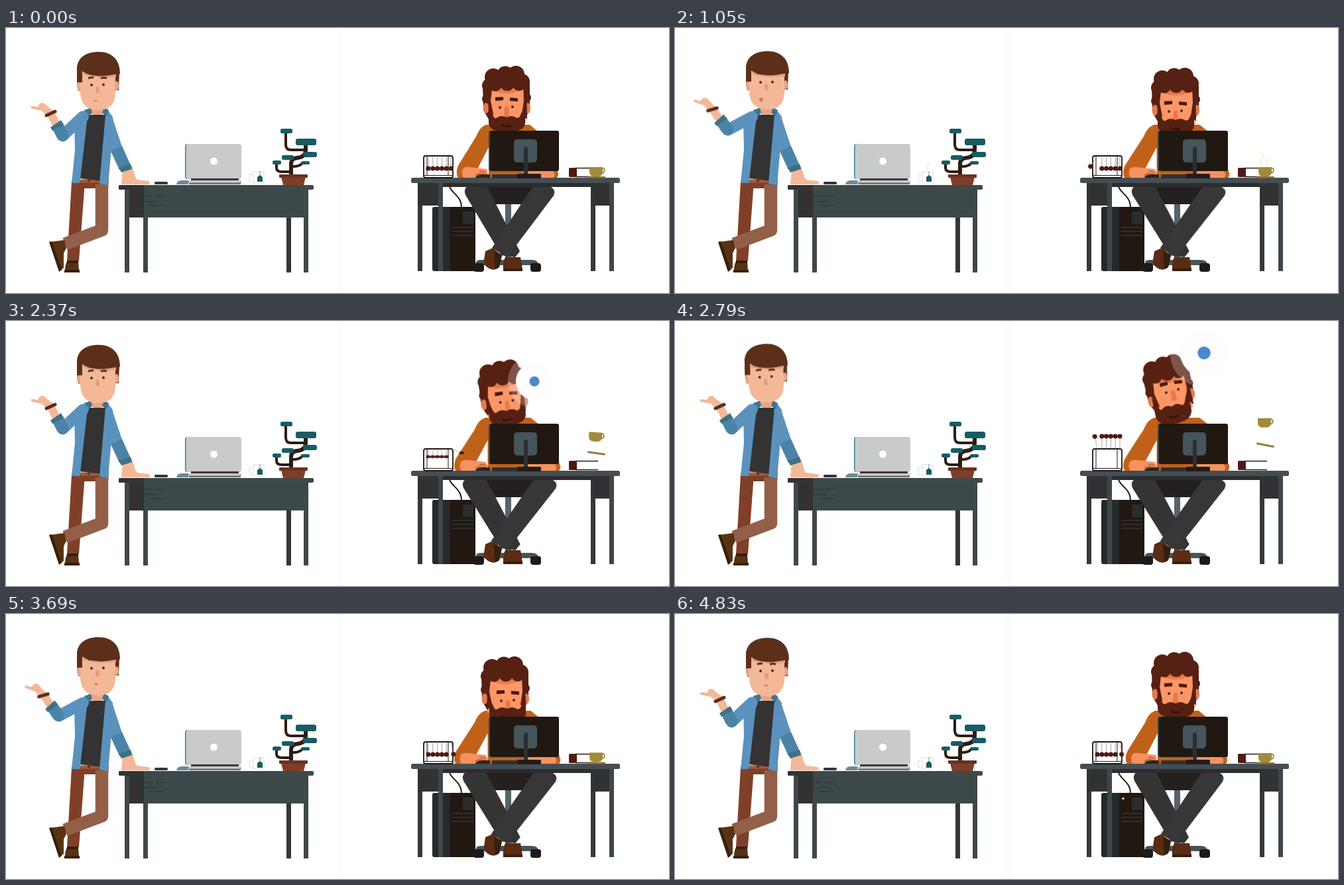
Write an HTML page without scripts that moves like this. It is 1000 by 400 pixels and loops after 4860 ms.

```html
<!DOCTYPE html>
<html lang="en">
<head>
<meta charset="utf-8">
<title>Two desks</title>
<style>
html, body { margin: 0; width: 100%; height: 100%; overflow: hidden; background: #fff; }
svg { display: block; width: 100vw; height: 100vh; }
.a { animation: 4860ms ease-in-out infinite; }

/* standing man */
.upper { animation-name: upper; transform-origin: 115px 135px; }
.fore { animation-name: fore; transform-origin: 84px 163px; }
.hand { animation-name: hand; transform-origin: 67px 128px; }
@keyframes upper { 0%, 13%, 48%, 68%, 97%, 100% { transform: none } 20%, 44.5%, 76%, 91% { transform: rotate(15deg) } }
@keyframes fore { 0%, 13%, 48%, 68%, 97%, 100% { transform: none } 20%, 44.5%, 76%, 91% { transform: rotate(-23deg) } }
@keyframes hand { 0%, 13%, 48%, 68%, 97%, 100% { transform: none } 20%, 44.5%, 76%, 91% { transform: rotate(16deg) } }
.headL { animation-name: headL; transform-origin: 138px 125px; }
@keyframes headL {
  0%, 100% { transform: none } 8% { transform: translate(-1px, -2px) rotate(-1deg) }
  21.6%, 39.5% { transform: translate(0, -1px) } 48.8% { transform: none }
  62%, 67.5% { transform: translate(0, -2px) rotate(-2.5deg) } 76%, 88% { transform: translate(0, -1px) }
}
.faceL { animation-name: faceL; }
@keyframes faceL { 0%, 13%, 48%, 58%, 97%, 100% { transform: none } 20%, 44%, 76%, 90% { transform: translate(0, -3px) } 67% { transform: translate(2px, -2px) } }
.browL { animation-name: browL; }
@keyframes browL { 0%, 13%, 48%, 68%, 97%, 100% { transform: none } 20%, 44%, 76%, 90% { transform: translate(0, -3px) } }
.mouthL { animation-name: mouthL; transform-origin: 136px 109px; }
@keyframes mouthL {
  0% { transform: translate(-1px, 1px) scale(1, .6) } 6% { transform: scale(.9, 1.4) }
  12% { transform: translate(-2px, 0) scale(1, .5) } 21.6% { transform: translate(-6px, 3px) scale(1, 1.5) }
  30% { transform: translate(-2px, 1px) scale(1.2, .6) } 39.5% { transform: translate(-1px, 1px) scale(1, 1.6) }
  46%, 70% { transform: scale(1, .2) }
  77% { transform: translate(0, 1px) scale(1.1, .7) } 85.2% { transform: translate(2px, 1px) scale(.8, 1.3) }
  92% { transform: scale(.8, 1.2) } 100% { transform: translate(1px, -1px) scale(1.1, .6) }
}
.hush { animation-name: hush; animation-timing-function: step-end; }
@keyframes hush { 0%, 72% { opacity: 1 } 46% { opacity: 0 } }

/* sitting man */
.headR { animation-name: headR; transform-origin: 755px 152px; }
@keyframes headR {
  0%, 100% { transform: none } 21.6% { transform: translate(0, 3px) } 39.5%, 45% { transform: translate(-2px, 7px) }
  48.8% { transform: translate(0, 2px) rotate(-6deg) } 57%, 67.5% { transform: translate(0, -6px) rotate(-12deg) }
  76%, 86% { transform: translate(-2px, 7px) }
}
.faceR { animation-name: faceR; }
@keyframes faceR {
  0%, 100% { transform: none } 21.6% { transform: translate(0, 3px) } 39.5%, 45%, 76%, 86% { transform: translate(4px, 4px) }
  48.8% { transform: translate(4px, 0) } 57%, 67.5% { transform: translate(4px, -8px) }
}
.jaw { animation-name: jaw; transform-origin: 755px 158px; }
@keyframes jaw {
  0%, 100% { transform: none } 21.6% { transform: translate(0, 1px) } 39.5%, 45%, 76%, 86% { transform: translate(3px, 1px) }
  48.8% { transform: translate(2px, -1px) } 57%, 67.5% { transform: translate(-2px, 4px) scaleY(1.2) }
}
.sit { animation-name: sit; transform-origin: 760px 0; }
@keyframes sit { 0%, 100% { transform: none } 20%, 86% { transform: scaleX(1.045) } }
.blink { animation-name: blink; transform-origin: 755px 119px; }
@keyframes blink { 0%, 38%, 41%, 100% { transform: none } 39%, 40% { transform: scaleY(.15) } }

/* weightless things */
.cup { animation-name: cup; transform-origin: 891px 217px; }
.saucer { animation-name: saucer; transform-origin: 890px 225px; }
.bubble { animation-name: bubble; }
.flip { animation-name: flip; transform-origin: 0 193px; }
@keyframes cup {
  0%, 45.3%, 76%, 100% { transform: none; animation-timing-function: ease-out }
  48.8% { transform: translate(-1px, -42px) rotate(4deg); animation-timing-function: ease-out }
  55.6% { transform: translate(-1px, -63px) rotate(0deg) }
  67.5% { transform: translate(-1px, -70px) rotate(-6deg); animation-timing-function: ease-in }
}
@keyframes saucer {
  0%, 45.3%, 76%, 100% { transform: none; animation-timing-function: ease-out }
  48.8% { transform: translate(0, -26px) rotate(8deg); animation-timing-function: ease-out }
  55.6% { transform: translate(0, -38px) rotate(11deg) }
  67.5% { transform: translate(0, -43px) rotate(15deg); animation-timing-function: ease-in }
}
@keyframes bubble {
  0%, 45%, 74.5%, 100% { transform: translate(782px, 185px) scale(0); animation-timing-function: ease-out }
  48.8% { transform: translate(797px, 91px) scale(.76); animation-timing-function: ease-out }
  55.6% { transform: translate(798px, 49px) scale(.97) }
  67.5% { transform: translate(798px, 33px) scale(1); animation-timing-function: ease-in }
}
@keyframes flip {
  0%, 45.3%, 76%, 100% { transform: none } 48.8% { transform: scaleY(.63) } 55.6%, 67.5% { transform: scaleY(-1) }
}

/* cradle */
.swingL, .swingR { animation: 810ms infinite; }
.swingL { animation-name: swingL; transform-origin: 637px 193px; }
.swingR { animation-name: swingR; transform-origin: 671px 193px; }
.kick { animation-name: kick; transform-origin: 671px 193px; }
@keyframes swingL { 0% { transform: none; animation-timing-function: ease-out } 25% { transform: rotate(35deg); animation-timing-function: ease-in } 50%, 100% { transform: none } }
@keyframes swingR { 0%, 50% { transform: none; animation-timing-function: ease-out } 75% { transform: rotate(-35deg); animation-timing-function: ease-in } 100% { transform: none } }
@keyframes kick { 0%, 45.3%, 54%, 100% { transform: none } 48.8% { transform: rotate(-44deg) } }

.lamp { animation-name: lamp; animation-timing-function: step-end; }
@keyframes lamp { 0%, 20%, 41%, 62% { opacity: 0 } 12%, 37%, 58%, 97% { opacity: 1 } }
.steam { animation-name: steam; }
@keyframes steam {
  0%, 45%, 77%, 100% { opacity: 0; transform: translate(0, 4px) }
  10% { opacity: .5 } 21.6% { opacity: .8; transform: translate(-3px, 0) }
  39.5% { opacity: .9; transform: translate(3px, 0) } 85.2% { opacity: .9; transform: none }
  99% { opacity: .2; transform: translate(3px, -2px) }
}
</style>
</head>
<body>
<svg viewBox="0 0 1000 400" preserveAspectRatio="none">
<defs>
  <g id="ball"><path d="M637 193V210" stroke="#8a7c70" stroke-width=".7"/><circle cx="637" cy="212" r="3.6" fill="#4d1a14"/></g>
</defs>
<path d="M497 0h9v400h-9z" fill="#fdfdfd"/>
<path d="M505 0h1v400h-1z" fill="#f8f8f8"/>

<g id="left-desk">
  <path d="M179 243h7v126h-7zM207 243h7v126h-7zM449 286h7v83h-7z" fill="#3f484b"/>
  <path d="M186 243h22v43h-22z" fill="#323233"/>
  <path d="M423 286h7v83h-7z" fill="#333536"/>
  <path d="M208 243h248v43h-248z" fill="#3d4849"/>
  <path d="M207 286h7v83h-7z" fill="#3f484b"/>
  <path d="M208 254h14M226 254h14M208 262h22M216 268h23" stroke="#2f3839" stroke-width="1.5"/>
  <rect x="170" y="237" width="294" height="7" rx="2" fill="#3f494b"/>
  <path d="M172 237h36v7h-36q-2 0-2-2v-3q0-2 2-2z" fill="#333334"/>
  <rect x="224" y="232" width="20" height="4" rx="1.5" fill="#333538"/>
  <path d="M257 236q1-6 8-6h10v6z" fill="#6b8b94"/>
  <rect x="270" y="175" width="20" height="53" rx="4" fill="#3d809a"/>
  <rect x="271.5" y="175" width="83.5" height="53" rx="4" fill="#c9cbca"/>
  <circle cx="313.5" cy="201" r="5.5" fill="#fff"/>
  <path d="M279 227h72v3h-72z" fill="#3a3937"/>
  <path d="M275 230h80v4l-2 3h-76l-2-3z" fill="#c6c9c8"/>
  <path d="M276 234.5h78" stroke="#464a49" stroke-width="1.5"/>
  <path d="M373 217h16v17h-16zM373 221h-6v11h6" fill="none" stroke="#e6e9e8" stroke-width="1.5"/>
  <path d="M383 216v7" stroke="#577" stroke-width=".8"/>
  <path d="M379 225l4-3 4 3v7h-8z" fill="#1a5a5e"/>
  <path class="a steam" d="M384 214q-3-4 0-7t1-5" fill="none" stroke="#eceeed" stroke-width="2"/>
  <g fill="none" stroke="#2d1d14" stroke-width="4">
    <path d="M422 156v20q0 8 8 8h22M408 205v6q0 6 8 6h12M447 204q-4 5-14 5"/>
    <path d="M430 223v-18q0-8 9-9 13-1 13-12v-10" stroke-width="6"/>
  </g>
  <g fill="#165d63">
    <rect x="414" y="152" width="18" height="7" rx="2.5"/><rect x="437" y="167" width="31" height="10" rx="3"/>
    <rect x="448" y="187" width="21" height="8" rx="3"/><rect x="416" y="192" width="18" height="7" rx="2.5"/>
    <rect x="402" y="200" width="13" height="6" rx="2.5"/><rect x="445" y="201" width="13" height="5" rx="2"/>
  </g>
  <path d="M415 225h37l-3 12h-31z" fill="#803e28"/>
  <rect x="412" y="221" width="43" height="5" rx="1" fill="#6a3221"/>
</g>

<g id="standing">
  <path d="M99 232h20l-9 120h-18z" fill="#803f28"/>
  <path d="M99 230h56l-1 12h-54z" fill="#803f28"/>
  <path d="M144.500 236V305L89 326" fill="none" stroke="#935f48" stroke-width="19.5" stroke-linejoin="round"/>
  <path d="M100 231h55" stroke="#9a5b43" stroke-width="5"/>
  <path d="M66 323l22-3 3 12-4 8v22l-6 5z" fill="#5a3212"/>
  <path d="M65 323l4-1 15 43-4 3z" fill="#33210f"/>
  <path d="M92 352h17l1 14H89q0-8 3-14z" fill="#5a3212"/>
  <path d="M92 351h17v4H92zM88 365h23v4H88z" fill="#33210f"/>
  <path d="M128 116h20v12l-10 8-10-8z" fill="#e9a584"/>
  <path d="M121 130l7 1h18l7-1-8 101-34-4z" fill="#333"/>
  <path d="M176 208l14-4 6 20 4 8h-26z" fill="#f3b898" transform="translate(0 4)"/>
  <path d="M178 219l12 1 8 9 17 2q4 2 1 5h-30q-4-2-3-6z" fill="#f3b898"/>
  <path d="M150 128l10 6 15 45-17 8-8-24z" fill="#5b92bd"/>
  <path d="M175 178l13 29-17 7-13-28z" fill="#4b83a8"/>
  <path d="M170 211l18-6 2 8-16 5z" fill="#3c7184"/>
  <path d="M152 122l9 12 1 14-8 89-13-2 9-104z" fill="#5b92bd"/>
  <path d="M120 122l3 10-11 97-1 5-12 0 5-50-1-42z" fill="#5b92bd"/>
  <path d="M119 124l9-4 2 8-6 6zM148 120l7 4-3 9-7-5z" fill="#3e7393"/>
  <path d="M157 150l-7 80" stroke="#4b80a6" stroke-dasharray="2 10"/>
  <path d="M125 226v6" stroke="#6a3221" stroke-width="4"/>
  <g class="a upper">
    <path d="M116 134L86 162" stroke="#5b92bd" stroke-width="17.5" stroke-linecap="round"/>
    <g class="a fore">
      <path d="M76 146l-9-18" stroke="#f3b898" stroke-width="12"/>
      <path d="M85 162l-7-14" stroke="#4b83a8" stroke-width="18"/>
      <circle cx="85.5" cy="162.5" r="9" fill="#4b83a8"/>
      <path d="M67 150l16-11 4 7-17 9z" fill="#3c7184"/>
      <g class="a hand">
        <path d="M73 126l-11 6-8-7-15-3q-3-3 0-4l9 1 3-5q6-3 9 2l6 5z" fill="#f3b898"/>
        <path d="M61 132l13-6" stroke="#5a2d1e" stroke-width="5" stroke-linecap="round"/>
      </g>
    </g>
  </g>
  <g class="a headL">
    <path d="M107 60h10v35h-8l-2-9zM163 66h8l-1 28h-6z" fill="#5c2f1a"/>
    <ellipse cx="111" cy="87" rx="4" ry="8" fill="#e9a584"/><ellipse cx="167" cy="87" rx="3" ry="7" fill="#e9a584"/>
    <path d="M112 58h53v39q0 27-26 27t-27-27z" fill="#f3b898"/>
    <path d="M114 68q10 9 52 6v-6z" fill="#e0a083"/>
    <g class="a faceL">
      <circle cx="129" cy="86" r="1.9" fill="#38221c"/><circle cx="147" cy="85.5" r="1.9" fill="#38221c"/>
      <path d="M136 89h4l1 8q-3 3-6 0z" fill="#e39b7c"/>
      <g class="a browL"><path d="M124 76q4-2 8-1M143 76q5-2 9 0" fill="none" stroke="#5c2f1a" stroke-width="3"/></g>
      <g class="a hush"><ellipse class="a mouthL" cx="136" cy="109" rx="3" ry="2" fill="#dc7756"/></g>
    </g>
    <path d="M107 82V62c0-16 12-26 33-26 20 0 32 12 32 33-13 1-22 5-36 3q-14-1-21-7v17z" fill="#5c2f1a"/>
  </g>
</g>

<g id="right-back">
  <path d="M669 239c2 10 18 14 18 32" fill="none" stroke="#231a16" stroke-width="2"/>
  <rect x="643" y="270" width="65" height="97" rx="3" fill="#24292a"/>
  <path d="M670 270h36q2 0 2 2v93q0 2-2 2h-36z" fill="#211812"/>
  <path d="M689 277h16v19h-16z" fill="#2a2d2d"/>
  <path d="M673 301h32M673 307h32M673 313h32" stroke="#2d302f" stroke-width="2"/>
  <circle class="a lamp" cx="676" cy="278.5" r="1.8" fill="#e8d77a"/>
  <path d="M753 262h9v90h-9z" fill="#56636a"/>
  <path d="M709 354q0-4 8-4h76q10 0 10 8h-94z" fill="#48545a"/>
  <rect x="705" y="355" width="16" height="13" rx="4" fill="#1e1a19"/><rect x="791" y="355" width="16" height="13" rx="4" fill="#1e1a19"/>
  <path d="M700 236h114v18q0 12-14 12h-86q-14 0-14-12z" fill="#24201f"/>
  <path d="M723 337l11-5 14 11-4 18q-8 7-17 1-8-5-6-12z" fill="#5a2c14"/>
  <path d="M736 337l12 6-4 18-6 3z" fill="#33200f"/>
  <path d="M753 346h23l3 18h-29q-1-10 3-18z" fill="#5a2c14"/>
  <path d="M750 363h29v4h-29z" fill="#33200f"/>
  <g class="a sit" fill="#343434">
    <path d="M695 240h31l49 97-7 9-21-3-54-91q-3-8 2-12z"/>
    <path d="M794 240h28q8 5 4 13l-70 93-23-14z" fill="#373737"/>
  </g>
</g>

<g id="sitting">
  <g class="a sit">
    <path d="M724 146h66l12 10v70h-74v-46l-18 35-28 11q-5-8 1-20l26-42q5-14 15-18z" fill="#c0611a"/>
    <path d="M688 213q4-4 12-3l26 3v13h-38q-5-6 0-13z" fill="#f6925f"/>
    <path d="M682 226q-4-6 0-14l9-2q-6 8-1 16z" fill="#c0611a"/>
    <path d="M780 212h50q5 8 1 14h-51z" fill="#f6925f"/>
    <path d="M820 212h10q5 8 1 14h-5q4-8-6-14z" fill="#c0611a"/>
  </g>
  <g class="a headR">
    <g fill="#562013">
      <path d="M719 84q36-16 71 0v40l-8 14h-54l-8-14z"/>
      <circle cx="735" cy="74" r="13"/><circle cx="753" cy="70" r="12.5"/><circle cx="769" cy="70" r="13"/><circle cx="778" cy="81" r="12"/>
      <circle cx="729" cy="87" r="11"/><circle cx="725" cy="107" r="7"/><circle cx="785" cy="105" r="7"/>
    </g>
    <ellipse cx="724" cy="121" rx="4.5" ry="8" fill="#e57a4b"/><ellipse cx="787" cy="121" rx="4" ry="8" fill="#e57a4b"/>
    <path d="M728 82h56v60h-56z" fill="#ff9666"/>
    <path d="M738 96q18 7 38-2v-8h-38z" fill="#e57a4b"/>
    <g fill="#562013">
      <path d="M726 72h58v18h-58z"/>
      <circle cx="738" cy="86" r="9.5"/><circle cx="756" cy="84" r="11"/><circle cx="774" cy="85" r="10"/>
      <path d="M727 85h7l-3 25 4 20-7 8zM785 85h-5l1 25-3 20 8 8z"/>
    </g>
    <g class="a faceR">
      <path d="M738 104.500l12-.5v5l-12 1zM760 105l12 1v5l-12-1z" fill="#47190f"/>
      <g class="a blink" fill="#47251b"><circle cx="745" cy="120" r="2"/><circle cx="764" cy="119" r="2"/></g>
      <path d="M752 119h6l1 14q-4 4-8 0z" fill="#e57a4b"/>
    </g>
    <g class="a jaw">
      <path d="M728 118l6 13q3 8 7 4 6-4 14 0 8-4 14 0 5 3 8-6l6-11v26q-2 13-28 13-25 0-27-13z" fill="#562013"/>
      <path d="M748 145q6 5 13 1v3q-7 2-13-1z" fill="#2e0e09"/>
    </g>
  </g>
</g>

<g id="right-desk">
  <path d="M621 233h31v35h-31zM882 233h28v35h-28z" fill="#313233"/>
  <path d="M621 268h7v99h-7zM882 268h7v99h-7z" fill="#36393b"/>
  <path d="M652 233h7v134h-7zM910 233h7v134h-7z" fill="#3e484c"/>
  <path d="M659 233h223v7H659z" fill="#2c2d2f"/>
  <rect x="611" y="226" width="315" height="8" rx="2.5" fill="#454e52"/>
  <rect x="733" y="221" width="42" height="6" rx="1" fill="#2a3236"/>
  <path d="M706 224q0-10 9-11 10-1 12 7v5z" fill="#f6925f"/>
  <path d="M708 222q8-5 16 0M714 217q6-2 10 2" fill="none" stroke="#b9592c" stroke-width="1.5"/>
  <path d="M708 226q1-5 10-5h12v5z" fill="#2a2423"/>
  <rect x="728" y="155" width="20" height="61" rx="3" fill="#3c4549"/>
  <rect x="730" y="155" width="104" height="61" rx="3" fill="#211812"/>
  <rect x="766" y="168" width="35" height="35" rx="5" fill="#46545b"/>
  <rect x="781" y="179" width="6" height="43" rx="3" fill="#2a2f32"/>
  <rect x="771" y="220" width="36" height="7" rx="1.5" fill="#211c1a"/>
  <path d="M859 211.500h34M859 224.500h34" stroke="#2d1a17" stroke-width="1.5"/>
  <rect x="849" y="211" width="12" height="14" rx="1.5" fill="#4f1b13"/>
  <g fill="none" stroke="#1f1512" stroke-width="1.8">
    <rect x="630" y="193" width="44" height="33" rx="3"/>
    <path d="M635 193v29M667 193v29M631 222.500h42" stroke-width="1"/>
  </g>
  <g class="a flip">
    <use href="#ball" class="swingL"/>
    <use href="#ball" x="6.8"/><use href="#ball" x="13.6"/><use href="#ball" x="20.4"/><use href="#ball" x="27.2"/>
    <g class="a kick"><g class="swingR"><use href="#ball" x="34"/></g></g>
  </g>
  <path class="a steam" d="M890 208q-7-6-2-11t-2-9M894 206q4-6 1-10" fill="none" stroke="#f6efcb" stroke-width="2"/>
  <rect class="a saucer" x="877" y="224" width="27" height="2.8" rx="1" fill="#8c722e"/>
  <g class="a cup">
    <circle cx="899" cy="215" r="3.8" fill="none" stroke="#a18a3c" stroke-width="2"/>
    <path d="M880 210h20v6q0 8-7 8h-6q-7 0-7-8z" fill="#a18a3c"/>
  </g>
</g>

<g class="a bubble">
  <circle r="53" fill="#fff" opacity=".24"/>
  <circle r="37" fill="#fdfdfd"/>
  <circle r="10" fill="#4a88cf"/>
</g>
</svg>
</body>
</html>
```
